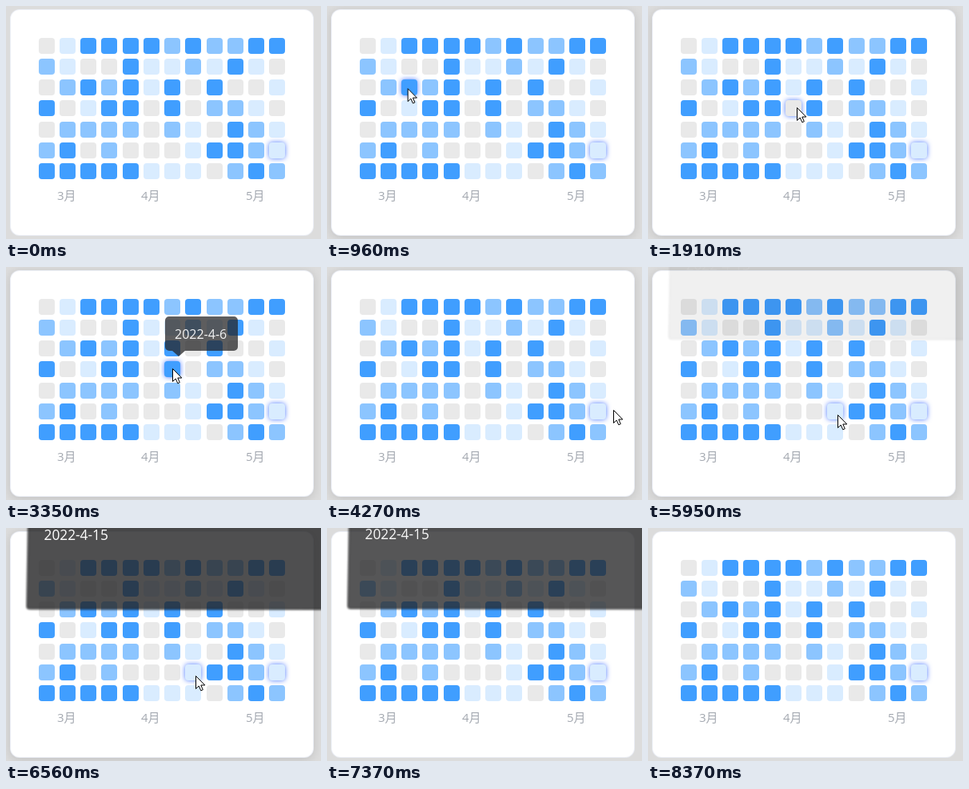
Recreate the animation shown at these times as an HTML page with a canvas. Size 394 px wide and 292 px high, loop 8.76 s.

```html
<!DOCTYPE html>
<html lang="zh">
<head>
<meta charset="utf-8">
<style>
html, body { margin: 0; width: 100%; height: 100%; overflow: hidden; background: #dcdcdc; }
canvas { display: block; }
</style>
</head>
<body>
<canvas id="stage" width="394" height="292"></canvas>
<script>
const ctx = document.getElementById('stage').getContext('2d');
const LOOP = 8760;
const SIZE = 20;
const SANS = '"Open Sans", "Noto Sans", "Noto Sans CJK SC", sans-serif';
const TIP_COLOR = 'rgba(36,36,37,.8)';
const COLORS = ['#e9e9e9', '#d9ecff', '#8cc5ff', '#409eff'];

// Activity per weekday, one digit per week
const ACTIVITY = [
  '013333232233',
  '210031121310',
  '023231303001',
  '301330302210',
  '022220210321',
  '230200013321',
  '333331110232',
];

// Pointer moves: start, end, destination
const MOVES = [
  [330, 1170, 118, 111],
  [1230, 1650, 178, 164],
  [1650, 1910, 186, 127],
  [2690, 2820, 208, 127],
  [3610, 3740, 263, 133],
  [3890, 4270, 358, 179],
  [4680, 5050, 340, 128],
  [5050, 5690, 237, 185],
  [6560, 6910, 316, 122],
  [7300, 7500, 296, 177],
  [7710, 8370, 394, 292],
];

const cellX = week => Math.round(40.75 + 26.22 * week);
const cellY = day => Math.round(39.8 + 26.2 * day);
const clamp = u => Math.min(1, Math.max(0, u));
const smooth = u => u * u * (3 - 2 * u);

function pointerAt(t) {
  if (t < 330 || t >= 8370 || (t >= 7300 && t < 7500)) return null;
  let x = 6, y = 60;
  for (const [start, end, toX, toY] of MOVES) {
    const u = smooth(clamp((t - start) / (end - start)));
    x += (toX - x) * u;
    y += (toY - y) * u;
  }
  return { x, y };
}

function fade(t, showAt, hideAt) {
  return smooth(clamp((t - showAt + 35) / 200)) * (1 - clamp((t - hideAt) / 210) ** 3);
}

function fillRound(x, y, w, h, r, color) {
  ctx.fillStyle = color;
  ctx.beginPath();
  ctx.roundRect(x, y, w, h, r);
  ctx.fill();
}

function text(label, x, y, size, color, weight = 400) {
  ctx.font = `${weight} ${size}px ${SANS}`;
  ctx.fillStyle = color;
  ctx.fillText(label, x, y);
}

function drawCard(raised) {
  ctx.save();
  if (raised) {
    ctx.shadowColor = 'rgba(0,0,0,.12)';
    ctx.shadowBlur = 12;
    ctx.shadowOffsetY = 2;
  }
  fillRound(5, 4, 380, 284, 12, '#ebeef5');
  ctx.restore();
  fillRound(6, 5, 378, 282, 11, '#fff');
}

function drawCells(pointer) {
  ACTIVITY.forEach((levels, day) => [...levels].forEach((level, week) => {
    const x = cellX(week), y = cellY(day);
    const today = day === 5 && week === 11;
    const hovered = pointer && pointer.x >= x && pointer.x < x + SIZE
      && pointer.y >= y && pointer.y < y + SIZE;
    ctx.save();
    if (today || hovered) {
      ctx.shadowColor = '#4f7cff';
      ctx.shadowBlur = 6;
    }
    fillRound(x, y, SIZE, SIZE, 4, COLORS[level]);
    ctx.restore();
  }));
}

function drawTip(label, x, width, alpha) {
  ctx.save();
  ctx.globalAlpha = alpha;
  ctx.fillStyle = TIP_COLOR;
  ctx.beginPath();
  ctx.roundRect(x, 62, width, 43, 5);
  ctx.moveTo(x + 9, 105);
  ctx.lineTo(x + 17, 112);
  ctx.lineTo(x + 25, 105);
  ctx.fill();
  text(label, x + 12, 90, 16, '#fff', 500);
  ctx.restore();
}

// Oversized, slightly tilted tip that slides down from the top edge
function drawBigTip(label, alpha) {
  ctx.save();
  ctx.globalAlpha = alpha;
  ctx.translate(0, 12 * (alpha - 1));
  ctx.filter = 'blur(1px)';
  ctx.beginPath();
  ctx.moveTo(28, -20);
  ctx.lineTo(26, 98);
  ctx.quadraticCurveTo(26, 101.5, 30, 101.5);
  ctx.lineTo(410, 102);
  ctx.lineTo(410, -20);
  ctx.fillStyle = TIP_COLOR;
  ctx.fill();
  ctx.strokeStyle = 'rgba(0,0,0,.4)';
  ctx.lineWidth = 2;
  ctx.stroke();
  ctx.filter = 'none';
  text(label, 47.5, 14.5, 17.3, '#fff', 500);
  ctx.restore();
}

function drawPointer({ x, y }) {
  ctx.save();
  ctx.translate(x + 0.5, y + 0.5);
  ctx.fillStyle = '#fff';
  ctx.strokeStyle = '#000';
  const arrow = new Path2D('M0 0V16L3.7 12.5 6.3 18.3 8.8 17.2 6.3 11.5H11.3Z');
  ctx.fill(arrow);
  ctx.stroke(arrow);
  ctx.restore();
}

function draw(t) {
  const pointer = pointerAt(t);
  // The hovered day stays lit while its tip is open
  const hoverTime = t > 6500 && t < 7300 ? 6500 : t;
  ctx.fillStyle = '#dcdcdc';
  ctx.fillRect(0, 0, 394, 292);
  drawCard(pointer && pointer.x < 385 && pointer.y < 288);
  drawCells(pointerAt(hoverTime));
  ['3月', '4月', '5月'].forEach((month, i) =>
    text(month, cellX([1, 5, 10][i]) - 3, 243, 15, '#a3a8b0'));
  drawTip('2022-3-30', 173, 99, fade(t, 2300, 2880));
  drawTip('2022-4-6', 199, 91, fade(t, 3220, 3890));
  drawBigTip('2022-4-15', fade(t, 5950, 7300));
  if (pointer) drawPointer(pointer);
}

const start = performance.now();
function tick() {
  draw((performance.now() - start) % LOOP);
  requestAnimationFrame(tick);
}
tick();
</script>
</body>
</html>
```
